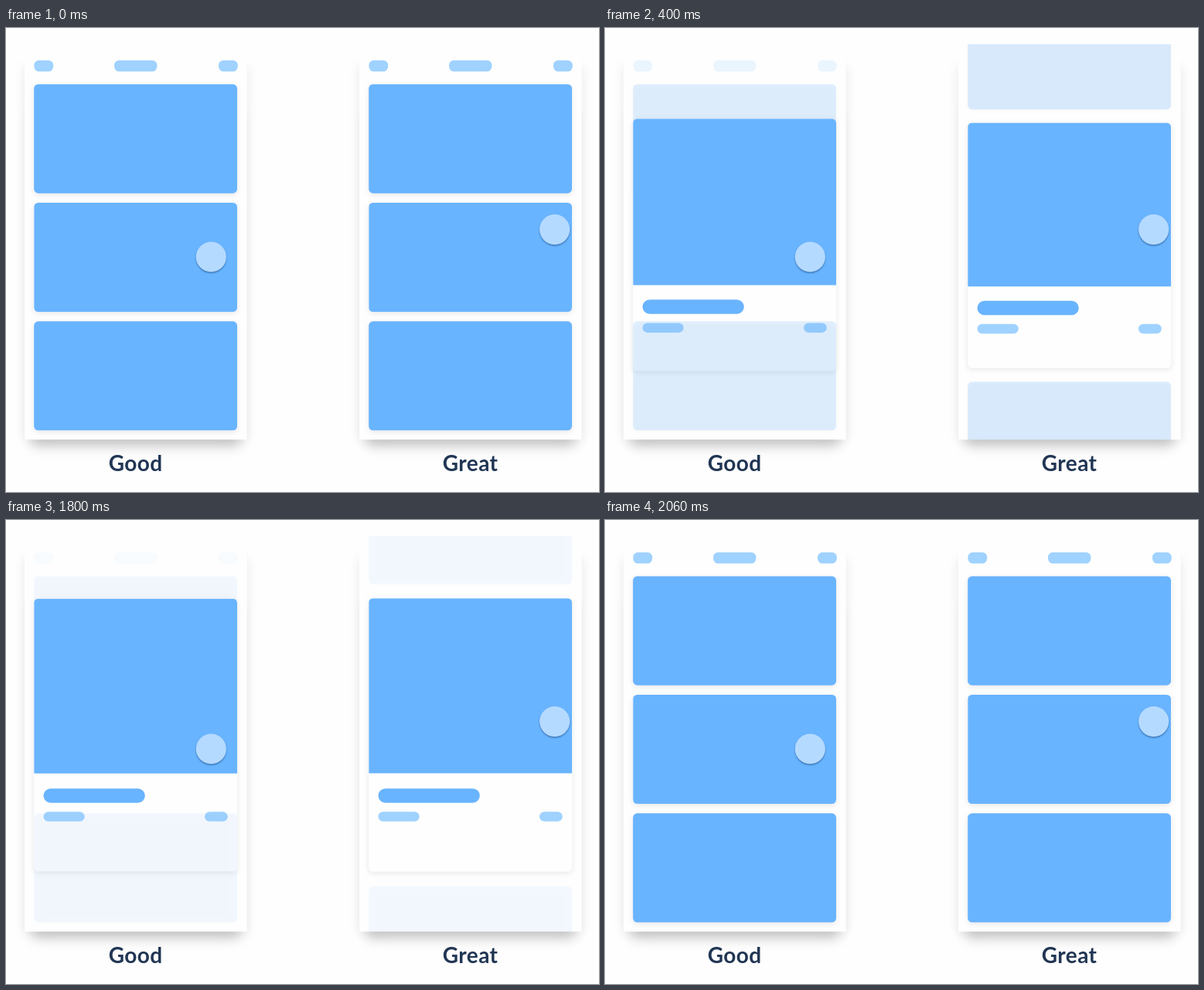
Write an HTML page with a canvas that moves like this. It is 767 px wide and 600 px high and loops after 2.2 s.

```html
<!DOCTYPE html>
<html lang="en">
<head>
<meta charset="utf-8">
<title>Card transitions</title>
<style>
  html, body { margin: 0; width: 100%; height: 100%; overflow: hidden; background: #fefefe; }
  canvas { display: block; }
</style>
</head>
<body>
<canvas width="767" height="600"></canvas>
<script>
const ctx = document.querySelector('canvas').getContext('2d');
const LOOP = 2200, FPS = 15;
const BLUE = '#69b4ff', PALE = '#a0d2ff', PAPER = '#fefefe', INK = '#213654';
const CARD = { x: 36.2, w: 262.8, h: 141, tops: [72.7, 226, 379.3] };

// open and close are [start, duration] in ms
const panels = [
  { label: 'Good', x: 0, touch: [265.3, 296], open: [190, 400], close: [1754, 285], scrolls: false },
  { label: 'Great', x: 433, touch: [276.7, 260.6], open: [225, 355], close: [1752, 303], scrolls: true },
];

// cubic-bezier(.4, 0, .2, 1), solved by bisection
function ease(x) {
  if (x <= 0) return 0;
  if (x >= 1) return 1;
  let lo = 0, hi = 1, s = 0.5;
  for (let i = 0; i < 24; i++) {
    const r = 1 - s;
    if (1.2 * r * r * s + 0.6 * r * s * s + s ** 3 < x) lo = s; else hi = s;
    s = (lo + hi) / 2;
  }
  return s * s * (3 - 2 * s);
}

const tween = (t, [start, duration]) => ease((t - start) / duration);

function box(x, y, w, h, r, fill) {
  ctx.beginPath();
  ctx.roundRect(x, y, w, h, r);
  ctx.fillStyle = fill;
  ctx.fill();
}

function withShadow(color, blur, dy, draw) {
  ctx.save();
  ctx.shadowColor = color;
  ctx.shadowBlur = blur;
  ctx.shadowOffsetY = dy;
  draw();
  ctx.restore();
}

function cardBox(y, h, fill) {
  withShadow('rgba(20,30,50,.1)', 7, 2, () => box(CARD.x, y, CARD.w, h, 5.5, fill));
}

function drawFrame() {
  withShadow('rgba(20,20,40,.09)', 14, 2, () => box(24, 48, 287.5, 484, 0, PAPER));
  withShadow('rgba(0,0,0,.2)', 15, 9, () => box(34, 100, 267.5, 432, 0, PAPER));
  box(24, 21, 287.5, 511.3, 0, PAPER);
}

function drawHeader(shift) {
  for (const [x, w] of [[36.4, 24.8], [140, 55.4], [275, 24.8]])
    box(x, 41.7 + shift, w, 14.6, 6.5, PALE);
}

function drawMainCard(p) {
  const top = CARD.tops[1] - 135 * p;
  ctx.save();
  cardBox(top, CARD.h + 230 * p, PAPER);
  ctx.clip();
  box(CARD.x, top, CARD.w, CARD.h + 92.3 * p, 0, BLUE);
  const rise = 35 * p;
  box(48.5, 379.5 - rise, 131.3, 18.5, 9.25, BLUE);
  box(48.5, 409.6 - rise, 53.2, 12.5, 6.25, PALE);
  box(257, 409.6 - rise, 29.8, 12.5, 6.25, PALE);
  ctx.restore();
}

function drawPanel(panel, t) {
  const p = tween(t, panel.open) - tween(t, panel.close);
  const up = panel.scrolls ? -141.5 * p : 0;
  const down = panel.scrolls ? 102 * p : 0;

  ctx.save();
  ctx.translate(panel.x, 0);
  drawFrame();

  ctx.save();
  ctx.beginPath();
  ctx.rect(24, 21, 287.5, 511.3);
  ctx.clip();
  ctx.globalAlpha = 1 - p;
  drawHeader(up);
  cardBox(CARD.tops[0] + up, CARD.h, BLUE);
  ctx.globalAlpha = 1;
  drawMainCard(p);
  ctx.globalAlpha = 1 - p;
  cardBox(CARD.tops[2] + down, CARD.h, BLUE);
  ctx.restore();

  const [cx, cy] = panel.touch, r = 19.6;
  withShadow('rgba(25,75,130,.6)', 2, 1.5, () => box(cx - r, cy - r, 2 * r, 2 * r, r, '#b5daff'));

  ctx.fillStyle = INK;
  ctx.fillText(panel.label, 167.6, 573);
  ctx.restore();
}

// The picture advances in steps of 1/15 s, on a clock of 10 ms ticks
function stepTime(ms) {
  const tick = Math.floor((ms % LOOP) / 10) * 10 + 9.99;
  return Math.floor(tick * FPS / 1000) * 1000 / FPS;
}

function render() {
  const t = stepTime(performance.now());
  ctx.fillStyle = PAPER;
  ctx.fillRect(0, 0, 767, 600);
  ctx.font = 'bold 28px Lato, sans-serif';
  ctx.letterSpacing = '0.4px';
  ctx.textAlign = 'center';
  for (const panel of panels) drawPanel(panel, t);
  requestAnimationFrame(render);
}
render();
</script>
</body>
</html>
```
